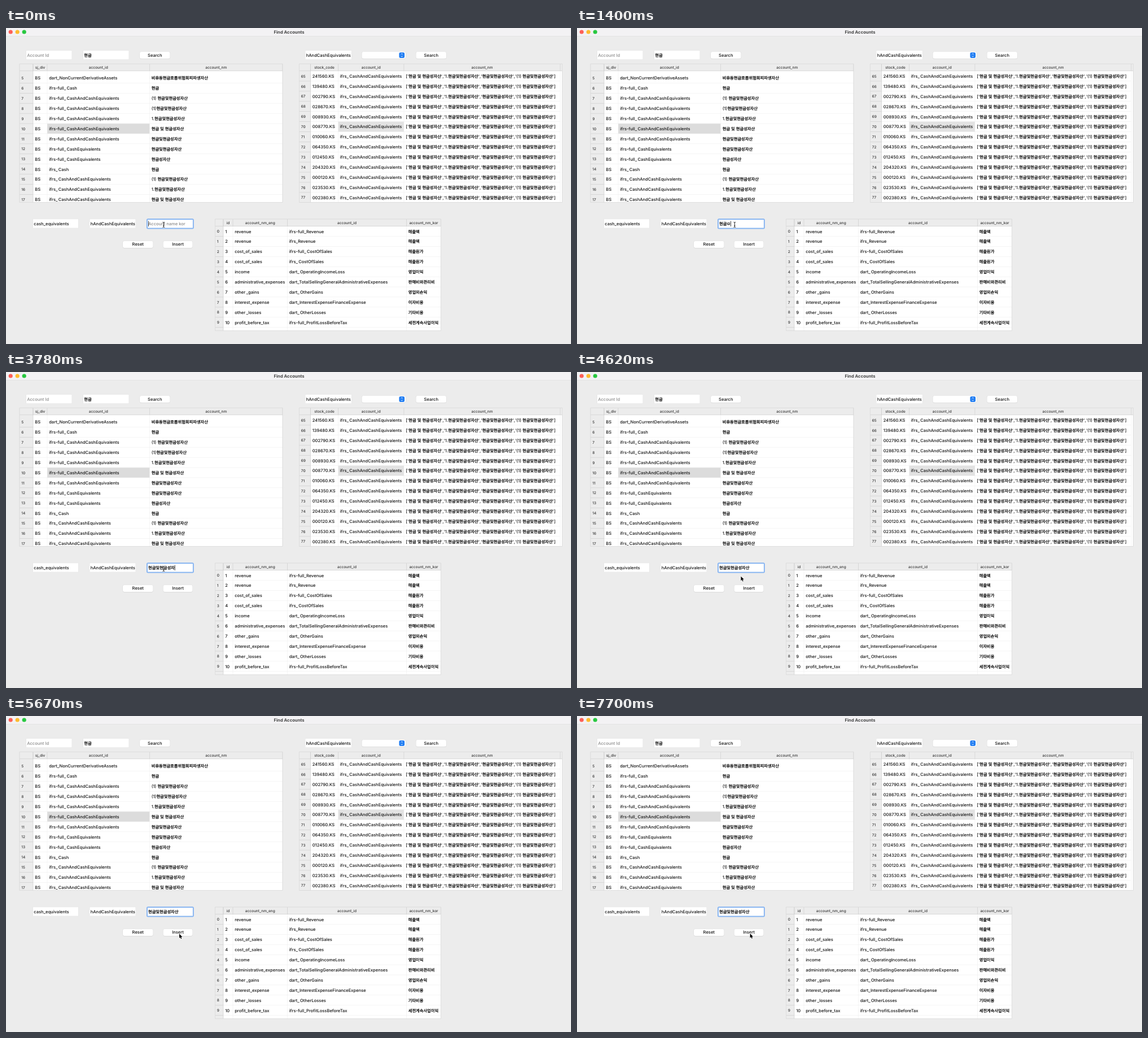
These frames come from a looping animation (1001x559 px, 8 s). An HTML page with a canvas:

```html
<!DOCTYPE html>
<html lang="ko">
<head>
<meta charset="utf-8">
<title>Find Accounts</title>
<style>
html, body { margin: 0; width: 100%; height: 100%; overflow: hidden; background: #ececec; }
canvas { display: block; width: 1001px; height: 559px; }
</style>
</head>
<body>
<canvas id="stage"></canvas>
<script>
const W = 1001, H = 559, LOOP = 8000, TICK = 70, PITCH = 17.9;
const stage = document.getElementById('stage');
const dpr = window.devicePixelRatio || 1;
stage.width = W * dpr;
stage.height = H * dpr;
const c = stage.getContext('2d');

const CASH = '현금및현금성자산';
const SPACED = '현금 및 현금성자산';
const IFRS = 'ifrs_CashAndCashEquivalents';
const FULL = 'ifrs-full_CashAndCashEquivalents';
const NAMES = `['${SPACED}','1.${CASH}','${CASH}','(1) ${CASH}']`;

const found = {
  x: 24, y: 63.5, w: 466, h: 245, first: 5, top: 79.7, headH: 12.5,
  cols: [48, 73, 254.5, 490], heads: ['sj_div', 'account_id', 'account_nm'], pad: 3.2,
  mark: [5, 1, '#dcdcdc'],
  rows: [
    ['dart_NonCurrentDerivativeAssets', '비유동현금흐름위험회피파생자산'],
    ['ifrs-full_Cash', '현금'],
    [FULL, '(1) ' + CASH],
    [FULL, '(1)' + CASH],
    [FULL, '1.' + CASH],
    [FULL, SPACED],
    [FULL, CASH],
    ['ifrs-full_CashEquivalents', CASH],
    ['ifrs-full_CashEquivalents', '현금성자산'],
    ['ifrs_Cash', '현금'],
    [IFRS, '(1) ' + CASH],
    [IFRS, '1.' + CASH],
    [IFRS, SPACED]
  ].map(r => ['BS', ...r])
};

const stocks = {
  x: 519.5, y: 63.5, w: 466, h: 245, first: 65, top: 76.2, headH: 12.5,
  cols: [539.5, 588.5, 705, 982], heads: ['stock_code', 'account_id', 'account_nm'], pad: 3.2,
  mark: [5, 1, '#e2e2e2'],
  rows: ('241560 139480 002790 028670 008930 008770 010060 ' +
    '064350 012450 204320 000120 023530 002380').split(' ')
    .map(code => [code + '.KS', IFRS, NAMES])
};

const saved = {
  x: 370.5, y: 338, w: 400, h: 197.5, first: 0, top: 350.8, headH: 12.8,
  cols: [385, 402, 498.5, 709.5, 770.5],
  heads: ['id', 'account_nm_eng', 'account_id', 'account_nm_kor'], pad: 3.2,
  rows: [
    ['revenue', 'ifrs-full_Revenue', '매출액'],
    ['revenue', 'ifrs_Revenue', '매출액'],
    ['cost_of_sales', 'ifrs-full_CostOfSales', '매출원가'],
    ['cost_of_sales', 'ifrs_CostOfSales', '매출원가'],
    ['income', 'dart_OperatingIncomeLoss', '영업이익'],
    ['administrative_expenses', 'dart_TotalSellingGeneralAdministrativeExpenses', '판매비와관리비'],
    ['other_gains', 'dart_OtherGains', '영업외손익'],
    ['interest_expense', 'dart_InterestExpenseFinanceExpense', '이자비용'],
    ['other_losses', 'dart_OtherLosses', '기타비용'],
    ['profit_before_tax', 'ifrs-full_ProfitLossBeforeTax', '세전계속사업이익']
  ].map((r, i) => [String(i + 1), ...r])
};

// Korean keystrokes: time and the text composed so far
const keys = [
  [770, 'ㅎ'], [840, '혀'], [980, '현'], [1050, '현ㄱ'], [1190, '현그'], [1260, '현금'],
  [1400, '현금ㅁ'], [1890, '현금미'], [1960, '현금및'],
  [2310, '현금및ㅎ'], [2450, '현금및혀'], [2590, '현금및현'], [2730, '현금및현ㄱ'],
  [2870, '현금및현그'], [2940, '현금및현금'], [3430, '현금및현금ㅅ'],
  [3500, '현금및현금서'], [3570, '현금및현금성'], [3710, '현금및현금성ㅈ'],
  [3780, '현금및현금성자'], [3990, '현금및현금성자사'], [4130, CASH]
];

// Pointer path: time, x, y
const path = [
  [0, 279.3, 348], [4410, 279.3, 348], [4620, 290.4, 361.4], [5100, 302, 376],
  [5460, 308, 386], [5670, 307, 385.3], [5810, 307, 385.3],
  [6440, 306.6, 384.7], [LOOP, 306.6, 384.7]
];

// Draws mixed Latin and Korean text, returns its right edge
function text(str, x, y, { size = 7.55, weight = 500, color = '#111', center = false } = {}) {
  // Underscores stand a little apart from round capitals and from a preceding r
  const spaced = str.replace(/_(?=[CO])|r(?=_g|_l)/g, '$&\u2009');
  const runs = (spaced.match(/[\u3131-\ud7a3]+|[^\u3131-\ud7a3]+/g) || []).map(run => {
    const hangul = run >= '\u3131';
    const font = hangul
      ? `${weight} ${size * 0.963}px "Noto Sans CJK KR", "Noto Sans CJK", sans-serif`
      : `${weight} ${size}px Inter, sans-serif`;
    const kerning = /[a-z]/i.test(run) ? 'normal' : 'none';
    c.font = font;
    c.fontKerning = kerning;
    return { run, hangul, font, kerning, width: c.measureText(run).width };
  });
  if (center) x -= runs.reduce((sum, r) => sum + r.width, 0) / 2;
  c.fillStyle = c.strokeStyle = color;
  c.lineWidth = 0.3;
  c.lineJoin = 'round';
  for (const r of runs) {
    c.font = r.font;
    c.fontKerning = r.kerning;
    c.fillText(r.run, x, y);
    if (r.hangul) c.strokeText(r.run, x, y);
    x += r.width;
  }
  return x;
}

function box(x, y, w, h, color) {
  c.fillStyle = color;
  c.fillRect(x, y, w, h);
}

function round(x, y, w, h, r, color) {
  c.fillStyle = color;
  c.beginPath();
  c.roundRect(x, y, w, h, r);
  c.fill();
}

function disc(x, y, r, color) {
  c.fillStyle = color;
  c.beginPath();
  c.arc(x, y, r, 0, 7);
  c.fill();
}

function field(x, y, w, str, color) {
  box(x - 0.5, y - 0.5, w + 1, 16.5, '#e4e4e4');
  box(x, y, w, 15.5, '#fff');
  text(str, x + 1.2, y + 10.8, { color });
}

function plate(x, y, w) {
  round(x - 0.4, y - 0.2, w + 0.8, 13.2, 3.4, '#d6d6d6');
  round(x, y, w, 12.2, 3, '#fff');
}

function button(x, y, w, label) {
  plate(x, y, w);
  text(label, x + w / 2, y + 8.7, { center: true });
}

function table(t) {
  const body = t.y + t.headH;
  const left = t.cols[0], last = t.cols[t.cols.length - 1];
  const small = { size: 6.5, color: '#333' };
  box(t.x, t.y, t.w, t.h, '#fff');
  c.save();
  c.beginPath();
  c.rect(t.x, t.y, t.w, t.h);
  c.clip();
  box(t.x, t.y, left - t.x, t.h, '#ececec');
  t.rows.forEach((row, i) => {
    const y = t.top + i * PITCH;
    if (t.mark && t.mark[0] === i) {
      const k = t.mark[1];
      box(t.cols[k], y, t.cols[k + 1] - t.cols[k], PITCH, t.mark[2]);
    }
    box(t.x, y + PITCH - 0.5, left - t.x, 0.7, '#cfcfcf');
    box(left, y + PITCH - 0.5, last - left, 0.6, '#eeeeee');
    text(String(t.first + i), t.x + 3.2, y + 11.4, small);
    row.forEach((cell, k) => text(cell, t.cols[k] + t.pad, y + 11.7));
  });
  t.cols.slice(1).forEach(x => box(x - 0.3, body, 0.6, t.h, '#eeeeee'));
  box(t.x, t.y, t.w, t.headH, '#ececec');
  box(t.x, body - 0.5, t.w, 0.7, '#cfcfcf');
  box(left - 0.4, t.y, 0.7, t.h, '#cfcfcf');
  t.cols.forEach(x => box(x - 0.4, t.y, 0.7, t.headH, '#cfcfcf'));
  t.heads.forEach((h, k) =>
    text(h, (t.cols[k] + t.cols[k + 1]) / 2, t.y + 8.8, { ...small, center: true }));
  c.restore();
  c.strokeStyle = '#d4d4d4';
  c.lineWidth = 0.7;
  c.strokeRect(t.x, t.y, t.w, t.h);
}

function combo() {
  plate(630.5, 42, 77.5);
  round(696.5, 43.2, 9.6, 9.8, 2.2, '#1d7bf2');
  c.strokeStyle = '#fff';
  c.lineWidth = 0.9;
  c.beginPath();
  for (const d of [-1, 1]) {
    c.moveTo(699.6, 48.1 + d * 1.2);
    c.lineTo(701.3, 48.1 + d * 2.9);
    c.lineTo(703, 48.1 + d * 1.2);
  }
  c.stroke();
}

function nameField(t) {
  round(249, 337.3, 83.8, 18.2, 2.5, '#84b3f1');
  box(250.9, 339.2, 80, 14.4, '#fff');
  const key = keys.filter(k => k[0] <= t).pop();
  let end = 252;
  if (key) end = text(key[1], 252, 348.9);
  else text('Account name kor', 252, 348.9, { color: '#8c8c8c' });
  const since = t < 770 ? t + 70 : t < 3780 ? 0 : t - 3780;
  if (Math.floor(since / 560) % 2 === 0) box(end, 341.5, 0.8, 9.5, '#111');
}

function pointerAt(t) {
  const i = path.findIndex(p => p[0] > t);
  const [t0, x0, y0] = path[i - 1], [t1, x1, y1] = path[i];
  const k = (t - t0) / (t1 - t0);
  return [x0 + (x1 - x0) * k, y0 + (y1 - y0) * k];
}

function pointer(t) {
  const [x, y] = pointerAt(t);
  c.save();
  c.translate(x, y);
  c.lineJoin = 'round';
  if (y < 355) {
    const beam = new Path2D('M-1.8-4.6Q0-4.6 0-3.4Q0-4.6 1.8-4.6M0-3.6V3.6M-1.8 4.6Q0 4.6 0 3.4Q0 4.6 1.8 4.6M-1 1.5H1');
    for (const [w, color] of [[1.8, '#fff'], [0.9, '#111']]) {
      c.lineWidth = w;
      c.strokeStyle = color;
      c.stroke(beam);
    }
  } else {
    const arrow = new Path2D('M0 0V7.8L1.8 6.2L3 9L4.3 8.4L3.1 5.7H5.5Z');
    c.lineWidth = 1.2;
    c.strokeStyle = '#fff';
    c.stroke(arrow);
    c.fillStyle = '#000';
    c.fill(arrow);
  }
  c.restore();
}

function draw(t) {
  c.setTransform(dpr, 0, 0, dpr, 0, 0);
  c.textRendering = 'geometricPrecision';
  box(0, 0, W, H, '#ececec');
  box(0, 0, W, 14, '#f3f2f4');
  box(0, 14, W, 0.6, '#e0e0e0');
  ['#fe5f57', '#febc2e', '#28c840'].forEach((color, i) => disc(8.2 + i * 12, 7, 3.6, color));
  text('Find Accounts', 501.5, 9.6, { size: 7.7, weight: 700, color: '#444', center: true });

  field(36, 40, 80.5, 'Account Id', '#8c8c8c');
  field(137, 40, 80.5, '현금');
  button(237, 42, 53.5, 'Search');
  field(530.5, 40, 81.5, 'hAndCashEquivalents');
  combo();
  button(726.5, 42, 53.5, 'Search');
  [found, stocks, saved].forEach(table);

  field(48, 338.2, 80, 'cash_equivalents');
  field(148.5, 338.2, 81, 'hAndCashEquivalents');
  nameField(t);
  button(207, 376.7, 53.5, 'Reset');
  button(278.5, 376.7, 52, 'Insert');
  pointer(t);
}

function frame() {
  const t = performance.now() % LOOP;
  draw(Math.floor(t / TICK) * TICK);
  requestAnimationFrame(frame);
}
frame();
</script>
</body>
</html>
```
